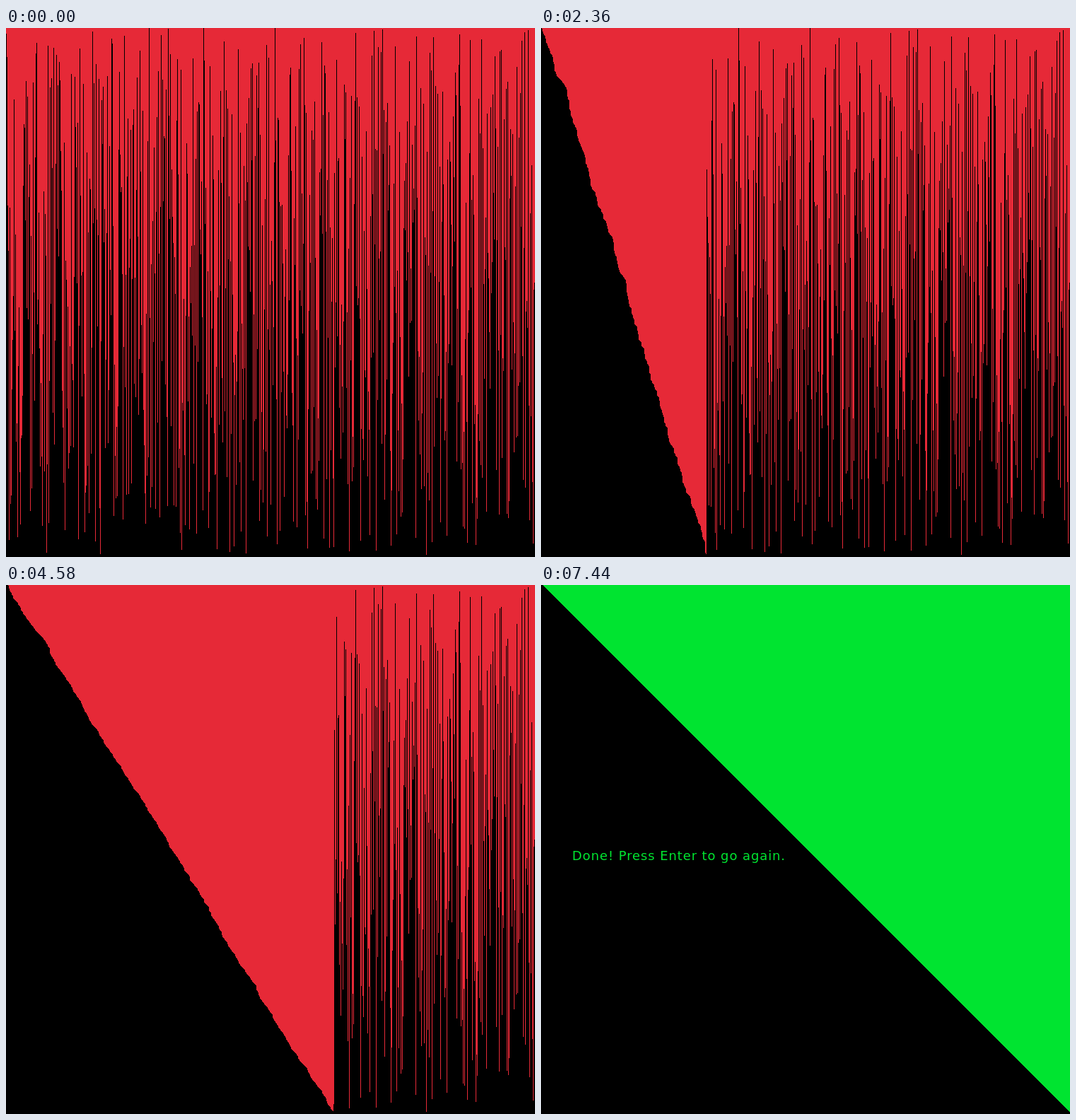
An HTML page with a canvas for the animation above (7.47 s loop, 748 px wide and 748 px high).

```html
<!DOCTYPE html>
<html lang="en">
<head>
<meta charset="utf-8">
<title>Insertion sort</title>
<style>
html, body { margin: 0; width: 100%; height: 100%; overflow: hidden; background: #000; }
canvas { display: block; width: 100vw; height: 100vh; }
</style>
</head>
<body>
<canvas id="stage" width="748" height="748"></canvas>
<script>
const SIZE = 748, LOOP = 7470, DONE = 7440;
const RED = '#e62937', GREEN = '#00e430';
const BLOCK = 44, BANDS = 11;
const ctx = document.getElementById('stage').getContext('2d');

// [time, number of sorted columns]
const pace = [[0, 0], [1380, 140], [2360, 234], [3870, 397], [5350, 536], [6560, 665], [DONE, SIZE]];

let seed = 20240;
function random() {
  seed = (Math.imul(seed, 1664525) + 1013904223) >>> 0;
  return seed / 4294967296;
}

function shuffle(list) {
  for (let i = list.length - 1; i > 0; i--) {
    const j = Math.floor(random() * (i + 1));
    [list[i], list[j]] = [list[j], list[i]];
  }
  return list;
}

// Every block draws equally from all height bands, so the sorted edge stays nearly straight
function buildColumns() {
  const bandSize = SIZE / BANDS;
  const bands = Array.from({ length: BANDS }, (_, b) =>
    shuffle(Array.from({ length: bandSize }, (_, i) => b * bandSize + i - 2)));
  const columns = [];
  while (columns.length < SIZE) {
    columns.push(...shuffle(bands.flatMap(band => band.splice(0, BLOCK / BANDS))));
  }
  return columns;
}

const columns = buildColumns();

function sortedCount(t) {
  if (t >= DONE) return SIZE;
  const i = pace.findIndex(([time]) => time > t);
  const [t0, n0] = pace[i - 1], [t1, n1] = pace[i];
  return Math.floor(n0 + (n1 - n0) * (t - t0) / (t1 - t0) + 1e-6);
}

function draw(t) {
  const done = t >= DONE;
  const count = sortedCount(t);
  const bars = columns.slice(0, count).sort((a, b) => a - b).concat(columns.slice(count));
  ctx.fillStyle = '#000';
  ctx.fillRect(0, 0, SIZE, SIZE);
  ctx.fillStyle = done ? GREEN : RED;
  bars.forEach((height, x) => ctx.fillRect(x, 0, 1, Math.max(0, height)));
  if (done) {
    ctx.font = '18px "DejaVu Sans", sans-serif';
    ctx.letterSpacing = '0.9px';
    ctx.fillText('Done! Press Enter to go again.', 44, 389);
  }
}

const begin = performance.now();
function tick() {
  draw((performance.now() - begin) % LOOP);
  requestAnimationFrame(tick);
}
tick();
</script>
</body>
</html>
```
